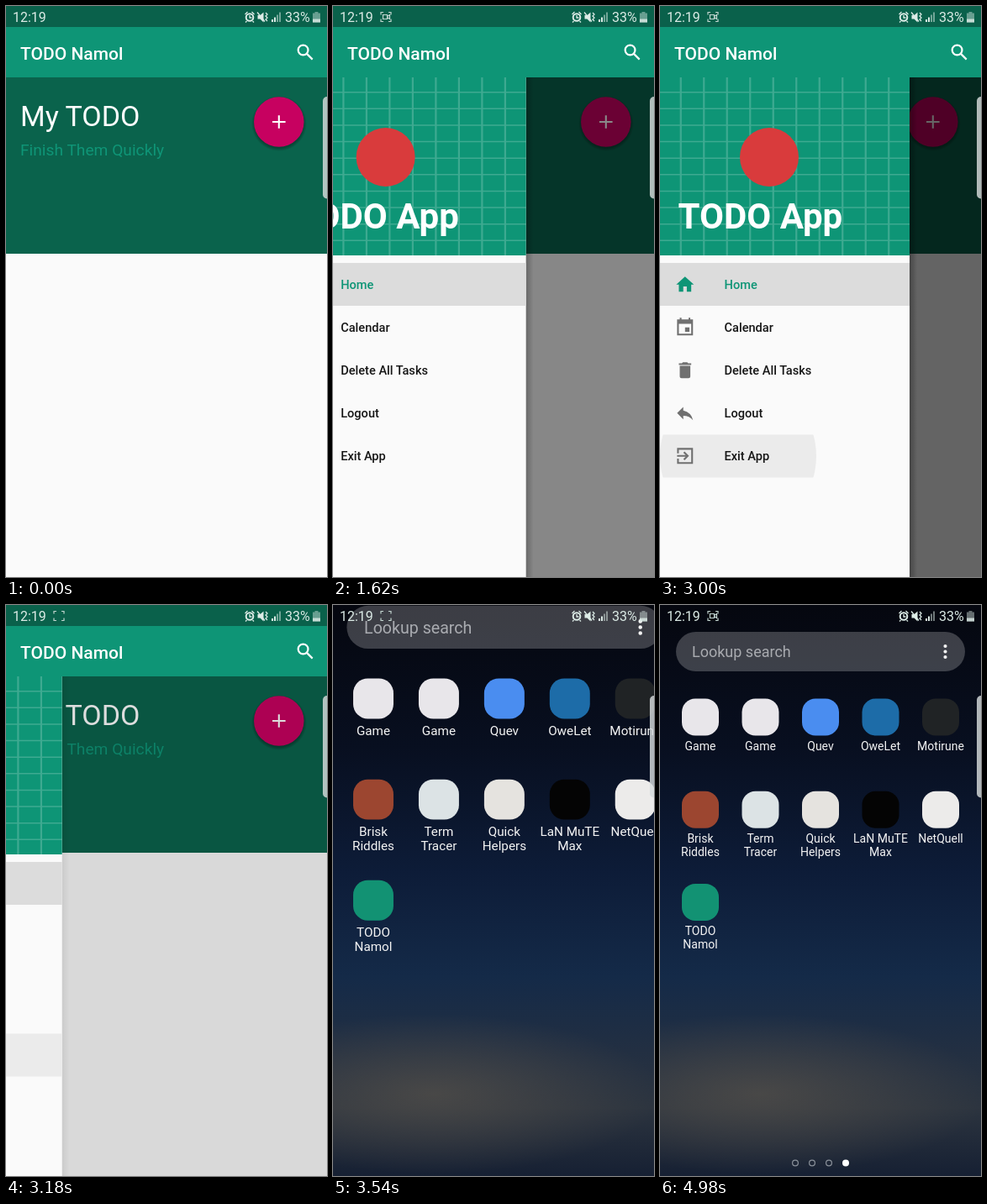
Animation of 382 by 680 pixels, one loop 5220 ms. Source, as an HTML page:

```html
<!DOCTYPE html>
<html lang="en">
<head>
<meta charset="utf-8">
<title>Todo app</title>
<style>
  html, body { margin: 0; width: 100%; height: 100%; overflow: hidden; background: #05070f; }
  svg { display: block; }
  text { font-family: Roboto, sans-serif; }
  .med { font-weight: 500; }
</style>
</head>
<body>
<svg width="382" height="680" viewBox="0 0 382 680">
  <defs>
    <linearGradient id="sky" x2="0" y2="1">
      <stop offset="0" stop-color="#05070f"/>
      <stop offset=".25" stop-color="#080f20"/>
      <stop offset=".47" stop-color="#0d1c38"/>
      <stop offset=".65" stop-color="#142a48"/>
      <stop offset=".78" stop-color="#222f42"/>
      <stop offset=".88" stop-color="#2c343f"/>
      <stop offset="1" stop-color="#162033"/>
    </linearGradient>
    <radialGradient id="glow">
      <stop offset="0" stop-color="#504d49" stop-opacity=".8"/>
      <stop offset="1" stop-color="#504d49" stop-opacity="0"/>
    </radialGradient>
    <linearGradient id="shade">
      <stop offset="0" stop-opacity=".3"/>
      <stop offset="1" stop-opacity="0"/>
    </linearGradient>
    <radialGradient id="soft">
      <stop offset=".88" stop-opacity=".3"/>
      <stop offset="1" stop-opacity="0"/>
    </radialGradient>
  </defs>

  <rect width="382" height="680" fill="url(#sky)"/>
  <ellipse cx="120" cy="582" rx="270" ry="95" fill="url(#glow)"/>

  <g id="launcher">
    <rect x="19" y="32" width="344" height="47" rx="23.5" fill="#fff" fill-opacity=".22"/>
    <text x="38" y="62" font-size="18" fill="#a9abb0">Lookup search</text>
    <path d="M339.5 49v0M339.5 55.5v0M339.5 62v0" stroke="#f2f2f2" stroke-width="4.2" stroke-linecap="round"/>
    <g id="icons" font-size="14" fill="#f4f4f4" text-anchor="middle"></g>
    <g fill="none" stroke="#8b929b" stroke-width="1.2">
      <circle cx="161" cy="664.5" r="3.4"/><circle cx="181" cy="664.5" r="3.4"/><circle cx="201" cy="664.5" r="3.4"/>
    </g>
    <circle cx="221" cy="664.5" r="4" fill="#fff"/>
  </g>

  <g id="app">
    <rect width="382" height="680" fill="#fafafa"/>
    <rect width="382" height="295" fill="#0a634c"/>
    <text x="17" y="143" font-size="34" fill="#fff">My TODO</text>
    <text x="17" y="178" font-size="19.2" fill="#0f9577">Finish Them Quickly</text>
    <circle cx="325" cy="140" r="33" fill="url(#soft)"/>
    <circle cx="324.8" cy="138" r="29.8" fill="#c70160"/>
    <path d="M317 138h15.6M324.8 130.2v15.6" stroke="#fff" stroke-width="2.1"/>
    <rect id="scrim" y="85" width="382" height="595"/>

    <g id="drawer">
      <rect id="edge" x="297" y="85" width="9" height="595" fill="url(#shade)"/>
      <rect y="85" width="297" height="595" fill="#fafafa"/>
      <rect y="85" width="297" height="212" fill="#0e9576"/>
      <path id="grid" transform="translate(0 85) scale(2.75 1.963)" fill="none" stroke="#fff" stroke-opacity=".2" stroke-width=".8"/>
      <circle cx="130" cy="180" r="35" fill="#d93b3c"/>
      <text x="21.5" y="265" font-size="42" font-weight="700" fill="#fff">TODO App</text>
      <rect y="306" width="297" height="51" fill="#dcdcdc"/>
      <svg y="510.5" width="297" height="51"><circle id="ripple" cx="93" cy="25.5" fill="#ebebeb"/></svg>
      <g id="menu" class="med" font-size="14.6"></g>
    </g>

    <rect width="382" height="25" fill="#0a614b"/>
    <rect y="25" width="382" height="60" fill="#0e9576"/>
    <text class="med" x="17" y="63.5" font-size="21" fill="#fff">TODO Namol</text>
    <g fill="none" stroke="#fff" stroke-width="2.2">
      <circle cx="353.6" cy="52.5" r="5.9"/>
      <path d="M358 56.900l6.700 6.700"/>
    </g>
  </g>

  <g fill="#dcebe6">
    <text x="8" y="19" font-size="16">12:19</text>
    <text x="332" y="19" font-size="16">33%</text>
    <g fill="none" stroke="#c3d6d0" stroke-width="1.2">
      <path id="corners" d="M57 10.5v-3h3M66 7.5h3v3M69 15.5v3h-3M60 18.5h-3v-3"/>
      <path id="camera" d="M59.5 10.5h5v5h-5zM64.5 12.5l3-2v5l-3-2"/>
    </g>
    <g fill="none" stroke="#dcebe6" stroke-width="1.3">
      <circle cx="290" cy="13.5" r="4.3" stroke-width="2"/>
      <path d="M290 11v3h2.5M284.5 10l3-3M295.5 10l-3-3M286.5 18l-1.5 1.5M293.5 18l1.5 1.5"/>
      <path d="M299 7.5l9 11M309 8l2 2-2 2 2 2-2 2 2 2"/>
    </g>
    <path d="M299.5 11h3l4-3.500v12l-4-4h-3z"/>
    <path d="M316 16h2v3h-2zM319 13.5h2v5.5h-2z"/>
    <path d="M322 10.5h2v8.5h-2zM325 7.5h2v11.5h-2z" opacity=".5"/>
    <path d="M367.5 7h4v1.5h2.5v11h-9v-11h2.5z" opacity=".45"/>
    <path d="M365 15.5h9v4h-9z" opacity=".8"/>
  </g>
  <rect x="377" y="108" width="12" height="121.5" rx="5" fill="#d7dcdc" fill-opacity=".82"/>
</svg>

<script>
const $ = id => document.getElementById(id);
const clamp = x => Math.min(1, Math.max(0, x));
const LOOP = 5220, STEP = 60, WIDTH = 297;

const apps = [
  ['Game', '#e8e6ea'], ['Game', '#e8e6ea'], ['Quev', '#4a8df0'], ['OweLet', '#1d6ca8'], ['Motirune', '#202325'],
  ['Brisk|Riddles', '#9c4630'], ['Term|Tracer', '#dce3e5'], ['Quick|Helpers', '#e5e3df'], ['LaN MuTE|Max', '#040404'], ['NetQuell', '#ecebea'],
  ['TODO|Namol', '#129273']
];
$('icons').innerHTML = apps.map(([name, color], i) => {
  const x = 48 + i % 5 * 71.5, y = 133.5 + Math.floor(i / 5) * 110.2;
  const lines = name.split('|').map((s, n) => `<text x="${x}" y="${y + 39.5 + n * 16}">${s}</text>`);
  return `<rect x="${x - 22}" y="${y - 22}" width="44" height="44" rx="16" fill="${color}"/>` + lines.join('');
}).join('');

// Menu glyphs on a 24 unit grid
const items = [
  ['Home', 'M10 20v-6h4v6h5v-8h3L12 3 2 12h3v8z'],
  ['Calendar', 'M17 12h-5v5h5zM16 1v2H8V1H6v2H3v18h18V3h-3V1zm3 18H5V8h14z'],
  ['Delete All Tasks', 'M6 7v12q0 2 2 2h8q2 0 2-2V7zM19 4h-3.5l-1-1h-5l-1 1H5v2h14z'],
  ['Logout', 'M10 9V5l-7 7 7 7v-4q7 0 11 5-2-9-11-11z'],
  ['Exit App', 'M10 15.6L11.5 17l5-5-5-5L10 8.400 12.700 11H3v2h9.700zM3 3v6h2V5h14v14H5v-4H3v6h18V3z']
];
$('menu').innerHTML = items.map(([name, d], i) => {
  const y = 332 + i * 51, color = i ? '#707070' : '#0e9576';
  return `<path transform="translate(17.2 ${y - 12.8}) scale(1.05)" fill="${color}" d="${d}"/>` +
    `<text x="76.5" y="${y + 5.2}" fill="${i ? '#161616' : color}">${name}</text>`;
}).join('');

// Full lines plus an inner set that makes the centre brighter
let grid = '';
for (let p = 9; p < 108; p += 10) {
  grid += `M${p} 0V108M0 ${p}H108`;
  if (p > 20 && p < 80) grid += `M${p} 19V89M19 ${p}H89`;
}
$('grid').setAttribute('d', grid);

function openness(t) {
  return t < 3025
    ? 1 - (1 - clamp((t - 1430) / 740)) ** 5
    : (1 - clamp((t - 3025) / 600)) ** 5;
}

function cameraOn(t) {
  const flips = [540, 1080, 1560, 2100, 2580, 3120, 3600, 4140, 4740];
  return flips.filter(f => t >= f).length % 2;
}

const scaleAt = (x, y, s) => `translate(${x} ${y}) scale(${s}) translate(${-x} ${-y})`;

function draw(t) {
  const open = openness(t);
  $('drawer').setAttribute('transform', `translate(${WIDTH * (open - 1)} 0)`);
  $('edge').setAttribute('opacity', open);
  $('scrim').setAttribute('opacity', .6 * open);
  $('ripple').setAttribute('r', t < 3000 ? 0 : Math.min(300, 93 + (t - 3000) * 1.5));

  const leave = clamp((t - 3280) / 190) ** 2;
  $('app').setAttribute('opacity', 1 - leave);
  $('app').setAttribute('transform', scaleAt(191, 340, 1 - .055 * leave));

  const size = t < 3480 ? 1 : 1 + .16 * (1 - clamp((t - 3480) / 240)) ** 2;
  $('launcher').setAttribute('transform', scaleAt(48, 378, size));

  $('corners').setAttribute('opacity', t < STEP ? 0 : 1);
  $('camera').setAttribute('opacity', cameraOn(t));
}

const start = performance.now();
function tick() {
  const t = (performance.now() - start) % LOOP;
  draw(Math.floor(t / STEP) * STEP);
  requestAnimationFrame(tick);
}
tick();
</script>
</body>
</html>
```
